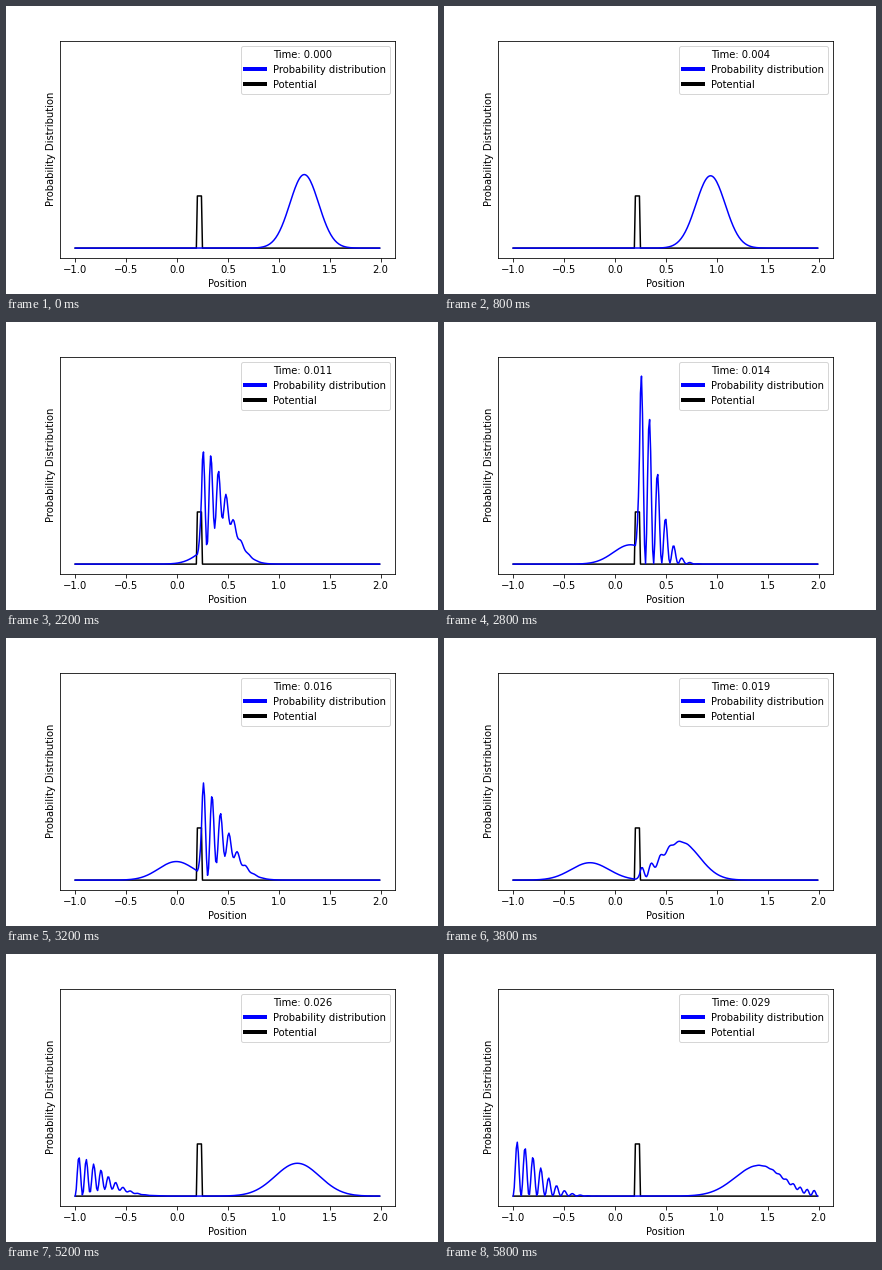
A matplotlib script that plays this animation: 432 by 288 pixels, repeating every 6000 ms.

```python
import numpy as np
import matplotlib.pyplot as plt
from matplotlib.animation import FuncAnimation
from matplotlib.lines import Line2D

FRAMES, INTERVAL = 30, 200
DT = 0.001                      # simulated time per frame
DX, K0, X0, WIDTH = 0.01, 40, 1.25, 0.2
Y_MAX = 7.58

plt.rcParams.update({"font.family": "DejaVu Sans", "font.size": 10})

# Wave packet moving left towards a thin barrier, inside hard walls
x = -1 + DX * np.arange(300)
barrier = np.zeros(x.size)
barrier[120:125] = 2000

psi = np.exp(-(x - X0) ** 2 / (2 * WIDTH ** 2) - 1j * K0 * x)
psi[[0, -1]] = 0
psi /= np.sqrt(np.sum(np.abs(psi) ** 2) * DX)

# Energy states of the finite-difference Hamiltonian -d2/dx2 + V
hop = np.full(x.size - 3, -1 / DX ** 2)
H = np.diag(2 / DX ** 2 + barrier[1:-1]) + np.diag(hop, 1) + np.diag(hop, -1)
energy, states = np.linalg.eigh(H)
coeffs = states.T @ psi[1:-1]


def density(t):
    p = np.zeros(x.size)
    p[1:-1] = np.abs(states @ (coeffs * np.exp(-1j * energy * t))) ** 2
    return p


fig = plt.figure(figsize=(6, 4), dpi=72, facecolor="white")
fig.subplots_adjust(left=0.125, right=0.9, bottom=0.125, top=0.88)
ax = fig.add_subplot()
ax.plot(x, barrier / 1000, color="black", lw=1.5)
wave, = ax.plot(x, density(0), color="blue", lw=1.5)
ax.set_ylim(-0.05 * Y_MAX, 1.05 * Y_MAX)
ax.set_yticks([])
ax.set_xlabel("Position")
ax.set_ylabel("Probability Distribution")

handles = [Line2D([0], [0], color=c, lw=4) for c in ("white", "blue", "black")]
legend = ax.legend(handles,
                   ["Time: 0.000", "Probability distribution", "Potential"],
                   loc="upper right")
clock = legend.get_texts()[0]


def update(i):
    t = i * DT
    wave.set_ydata(density(t))
    clock.set_text(f"Time: {t:.3f}")
    return wave, clock


anim = FuncAnimation(fig, update, frames=FRAMES, interval=INTERVAL,
                     repeat=True, repeat_delay=0)
plt.show()
```
